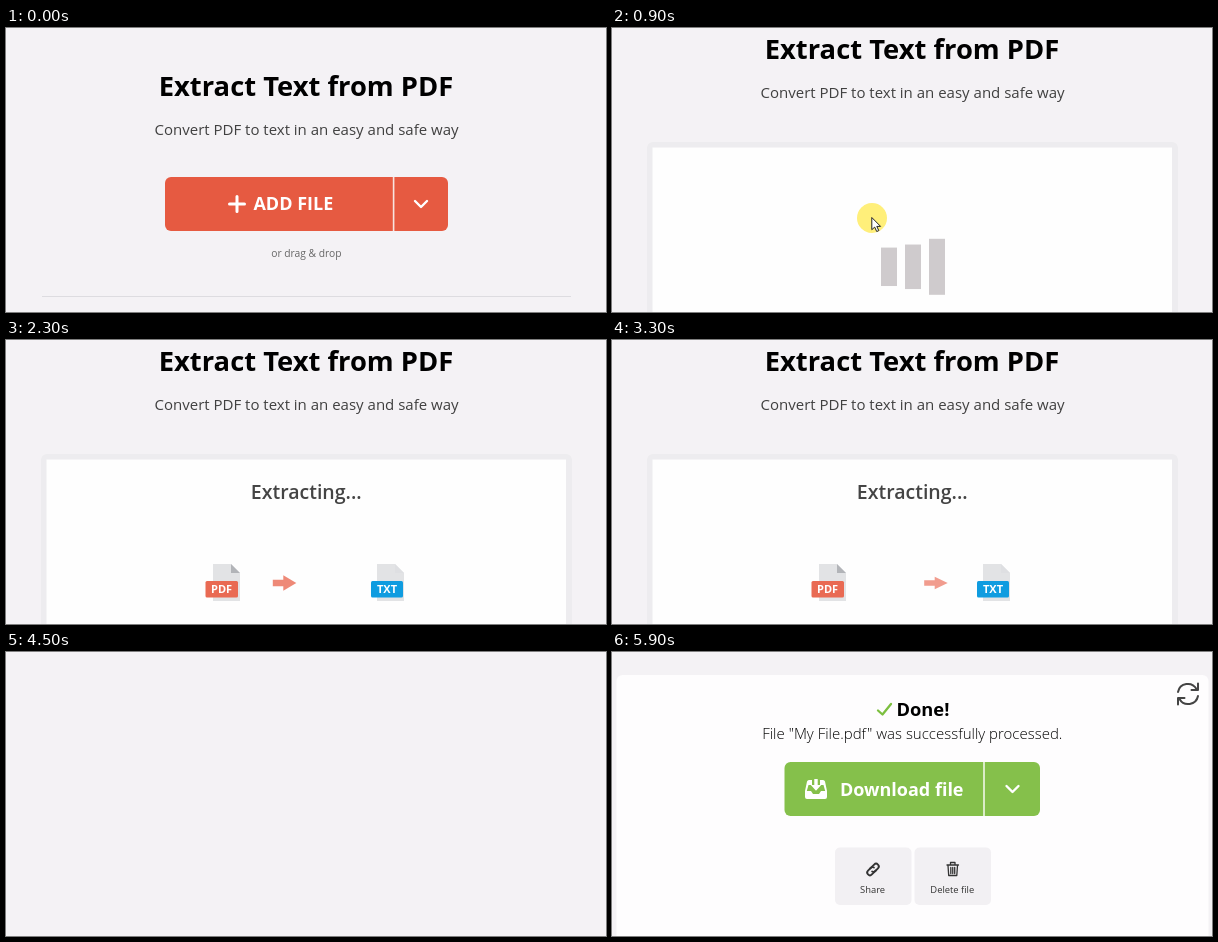
An HTML page that plays this animation: 600 px wide and 284 px high, repeating every 6100 ms.

```html
<!DOCTYPE html>
<html lang="en">
<head>
<meta charset="utf-8">
<title>Extract Text from PDF</title>
<style>
  html, body { margin: 0; width: 100%; height: 100%; overflow: hidden; background: #f4f2f5; }
  svg { display: block; width: 600px; height: 284px; }
  text { font-family: "Open Sans", sans-serif; }
  .mid { text-anchor: middle; }
  .bold { font-weight: 700; }
  .white { fill: #fff; }
  .line { fill: none; stroke-linecap: round; stroke-linejoin: round; }
  .btn { font-size: 18px; font-weight: 700; fill: #fff; }
  .tag { font-size: 11px; font-weight: 700; fill: #fff; text-anchor: middle; }
  .small { font-size: 9.4px; fill: #333; text-anchor: middle; }
</style>
</head>
<body>
<svg viewBox="0 0 600 284">
  <defs>
    <path id="chevron" class="line" d="M-6 -3L0 3L6 -3" stroke="#fff" stroke-width="2.4"/>
    <path id="pointer" d="M0 0V12.2L2.9 9.6L4.9 14L7 13.1L5 8.9H8.8Z" fill="#fff" stroke="#222" stroke-width="1"/>
    <circle id="halo" r="15" fill="#ffe100" fill-opacity=".52"/>
    <path id="sheet" d="M0 0H18L27 9V37H0Z" fill="#e2e3e5"/>
  </defs>

  <rect width="600" height="284" fill="#f4f2f5"/>

  <g id="page">
    <g id="head">
      <text class="mid bold" x="300" y="67.500" font-size="27.350">Extract Text from PDF</text>
      <text class="mid" x="300.600" y="107.300" font-size="15" fill="#404040">Convert PDF to text in an easy and safe way</text>
    </g>

    <g id="upload">
      <rect x="159" y="149" width="283" height="54" rx="6" fill="#e65a41"/>
      <rect x="386.800" y="149" width="1.600" height="54" fill="#f8e4e0"/>
      <path class="line" d="M223.500 176H238.500M231 168.500V183.500" stroke="#fff" stroke-width="3"/>
      <text class="btn" x="247.400" y="182.400">ADD FILE</text>
      <use href="#chevron" x="415" y="176"/>
      <text class="mid" x="300.400" y="229" font-size="10.300" fill="#666">or drag &amp; drop</text>
      <rect x="36" y="268" width="529" height="1" fill="#dddce0"/>
    </g>

    <g id="panel">
      <rect x="35" y="114" width="531" height="200" rx="6" fill="#edecef"/>
      <rect x="40.500" y="119.500" width="519.500" height="190" fill="#fefefe"/>
    </g>

    <g id="loader">
      <g id="bars" fill="#cfcbcd">
        <rect x="269" width="16"/><rect x="293" width="16"/><rect x="317" width="16"/>
      </g>
      <use href="#halo" x="260" y="190"/>
      <use href="#pointer" x="259.800" y="189.500"/>
    </g>

    <g id="extract">
      <text class="mid" x="300.300" y="158.700" font-size="19.550" font-weight="600" fill="#444">Extracting...</text>
      <use href="#sheet" x="207" y="224"/>
      <path d="M225 224L234 233H225Z" fill="#b2b4b8"/>
      <rect x="199.500" y="241" width="32.500" height="16.500" rx="1.500" fill="#e96a53"/>
      <text class="tag" x="215.600" y="253.300">PDF</text>
      <use href="#sheet" x="371" y="224"/>
      <path d="M389 224L398 233H389Z" fill="#dedfe2"/>
      <rect x="365" y="241" width="32" height="16.500" rx="1.500" fill="#0f9ce0"/>
      <text class="tag" x="381" y="253.300">TXT</text>
      <path id="arrow" d="M0 -3.300H10.500V-7.800L23.500 0L10.500 7.800V3.300H0Z" fill="#e8614a"/>
    </g>
  </g>

  <g id="drop">
    <rect width="600" height="284" fill="#000" fill-opacity=".5"/>
    <path class="line" d="M6 2V284M594 2V284" stroke="#fff" stroke-width="4" stroke-dasharray="0 8"/>
    <text class="mid bold white" x="311.500" y="15.600" font-size="18">Drop the file(s) here</text>
    <g id="file">
      <rect x="197.500" y="128.500" width="76.500" height="78" rx="2" fill="#d3d9df" fill-opacity=".85" stroke="#7f8c98"/>
      <rect x="201" y="131.500" width="69.500" height="72" fill="#e6e1e0" fill-opacity=".9"/>
      <path id="lines" fill="none" stroke="#3d3836" stroke-width="1.200" stroke-opacity=".85" stroke-dasharray="4 .6 2.500 .5 6 .7"/>
      <rect x="256" y="186" width="16" height="17" fill="#dc3545"/>
      <use href="#halo" x="246.300" y="194.500"/>
      <rect x="244" y="208.500" width="42" height="13" fill="#fff" stroke="#d8d8d8" stroke-width=".8"/>
      <path class="line" d="M247 215.300H255M251.800 212L255 215.300L251.800 218.600" stroke="#1c62b9" stroke-width="1.200"/>
      <text x="258.300" y="218.400" font-size="9.200" fill="#1c55a0">Move</text>
      <use href="#pointer" x="246.500" y="194"/>
    </g>
  </g>

  <g id="done">
    <rect x="4.500" y="23" width="592" height="290" rx="6" fill="#fefdfe"/>
    <g class="line" stroke="#444" stroke-width="2">
      <path d="M566 40A10 10 0 0 1 584.500 37M586 44A10 10 0 0 1 567.500 47"/>
      <path d="M586 31.500V38H579.500M566 52.500V46H572.500"/>
    </g>
    <path class="line" d="M266 58.500L270.500 62.500L279 52" stroke="#7cbf3f" stroke-width="2.300"/>
    <text class="bold" x="284.500" y="64" font-size="18.300">Done!</text>
    <text class="mid" x="300.300" y="87.300" font-size="15" font-weight="300">File "My File.pdf" was successfully processed.</text>

    <rect x="172.500" y="110" width="255.500" height="54" rx="6" fill="#85c04b"/>
    <rect x="371.200" y="110" width="1.600" height="54" fill="#eff7e6"/>
    <path d="M197 128H200V133H196.500L194.800 139H199L201 142H207L209 139H213.200L211.500 133H208V128H211Q212.500 128 213 129.500L215 139V145Q215 147 213 147H195Q193 147 193 145V139L195 129.500Q195.500 128 197 128Z" fill="#fff"/>
    <path d="M202.300 127H205.700V133H209.200L204 138.800L198.800 133H202.300Z" fill="#fff"/>
    <text class="btn" x="228" y="144.200">Download file</text>
    <use href="#chevron" x="400.500" y="137"/>

    <rect x="223" y="195.500" width="76.500" height="57.500" rx="5" fill="#f2f0f3"/>
    <g class="line" stroke="#333" stroke-width="1.900" transform="translate(261 217.500) rotate(-45)">
      <path d="M1.500 2.700H-4.300A2.700 2.700 0 0 1 -4.300 -2.700H-.5A2.700 2.700 0 0 1 2 -.8"/>
      <path d="M-1.500 -2.700H4.300A2.700 2.700 0 0 1 4.300 2.700H.5A2.700 2.700 0 0 1 -2 .8"/>
    </g>
    <text class="small" x="260.600" y="240.500">Share</text>

    <rect x="302.500" y="195.500" width="76.500" height="57.500" rx="5" fill="#f2f0f3"/>
    <path class="line" d="M335 213H346.500M338.500 212.500V210.500H343V212.500M336 213.500L336.700 223.500H344.800L345.500 213.500M338.800 215.500V221.500M340.750 215.500V221.500M342.700 215.500V221.500" stroke="#333" stroke-width="1.300"/>
    <text class="small" x="340.300" y="240.500">Delete file</text>
  </g>
</svg>

<script>
  const LOOP = 6100, TICK = 100;
  const $ = id => document.getElementById(id);
  const show = (id, on) => { $(id).style.display = on ? '' : 'none'; };
  const clamp = v => Math.min(1, Math.max(0, v));
  const bars = [...$('bars').children];

  // Rows of text on the dragged document
  let rows = '';
  for (let i = 0; i < 27; i++) {
    const end = i % 7 === 6 ? 240 : 256 + i % 3;
    rows += `M${212 + i % 2} ${136.5 + i * 2.3}H${end}`;
  }
  $('lines').setAttribute('d', rows);

  // cubic-bezier(0, .5, .5, 1)
  function easeOut(x) {
    let lo = 0, hi = 1, s = .5;
    for (let i = 0; i < 20; i++) {
      s = (lo + hi) / 2;
      if (1.5 * s * s - .5 * s ** 3 < x) lo = s; else hi = s;
    }
    const r = 1 - s;
    return 1.5 * r * r * s + 3 * r * s * s + s ** 3;
  }

  function drawBars(t) {
    bars.forEach((bar, i) => {
      const phase = (t - 876 + (2 - i) * 120 + 1200) % 1200;
      const h = 64 - 32 * easeOut(clamp(phase / 600));
      bar.setAttribute('y', 238.8 - h / 2);
      bar.setAttribute('height', h);
    });
  }

  // The arrow slides right, getting flatter and paler on the way
  function drawArrow(t) {
    const q = (t - 1000) % 1200 / 1200;
    const ease = (1 - Math.cos(Math.PI * q)) / 2;
    const x = 266 + 47 * ease;
    const fade = clamp(12 * Math.min(q, 1 - q));
    $('arrow').setAttribute('transform', `translate(${x} 243) scale(1 ${1 - .2 * ease})`);
    $('arrow').setAttribute('opacity', (.75 - .13 * ease) * fade);
  }

  function draw(t) {
    const dragging = t >= 400 && t < 800;
    const working = t >= 800;
    const loading = working && t < 1400;
    const extracting = t >= 1400 && t < 4500;

    show('page', t < 4500);
    show('upload', !working);
    show('panel', working);
    show('loader', loading);
    show('extract', extracting);
    show('drop', dragging);
    show('done', t >= 4700);

    $('head').setAttribute('transform', `translate(0 ${working ? -37 : 0})`);
    $('page').setAttribute('opacity', clamp((4500 - t) / 300));
    $('done').setAttribute('opacity', clamp((t - 4600) / 500));

    if (dragging) {
      const [x, y] = t < 500 ? [-50, 30] : t < 600 ? [0, 0] : [13, -5];
      $('file').setAttribute('transform', `translate(${x} ${y})`);
    }
    if (loading) drawBars(t);
    if (extracting) drawArrow(t);
  }

  const start = performance.now();
  function frame() {
    const t = (performance.now() - start) % LOOP;
    draw(Math.floor(t / TICK) * TICK);
    requestAnimationFrame(frame);
  }
  frame();
</script>
</body>
</html>
```
